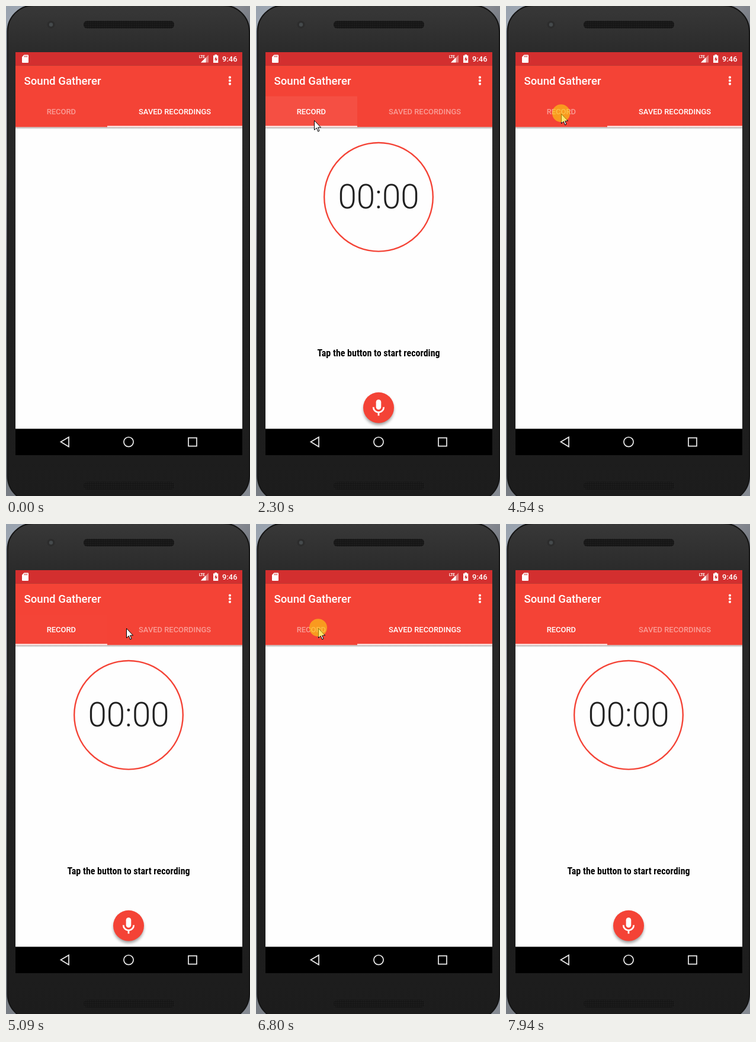
An HTML page that plays this animation: 412x828 px, repeating every 8.32 s.

```html
<!DOCTYPE html>
<html lang="en">
<head>
<meta charset="utf-8">
<title>Recorder tabs</title>
<style>
  html, body { margin: 0; width: 100%; height: 100%; overflow: hidden; }
  svg { display: block; width: 412px; height: 828px; }
  text { font-family: Roboto, sans-serif; fill: #fff; }
  .title { font-size: 18.64px; font-weight: 500; }
  .tab { font-size: 12.95px; font-weight: 500; text-anchor: middle; }
  .clock { font-size: 13px; font-weight: 500; }
  .lte { font-size: 6.4px; font-weight: 700; letter-spacing: -.3px; }
  .timer { font-size: 56.5px; font-weight: 300; fill: #212121; text-anchor: middle; }
  .tip { font: 700 16px "Roboto Condensed", Roboto, sans-serif; font-stretch: condensed; fill: #000; text-anchor: middle; }
  .nav { fill: none; stroke: #eee; stroke-width: 1.7; }
</style>
</head>
<body>
<svg viewBox="0 0 412 828">
  <defs>
    <linearGradient id="wall" x2=".6" y2="1">
      <stop offset="0" stop-color="#98a2ae"/>
      <stop offset=".25" stop-color="#bdbcc6"/>
      <stop offset=".5" stop-color="#6c7178"/>
      <stop offset="1" stop-color="#858a92"/>
    </linearGradient>
    <linearGradient id="body" x2="0" y2="1">
      <stop offset="0" stop-color="#383838"/>
      <stop offset=".1" stop-color="#2a2a2a"/>
      <stop offset=".5" stop-color="#222"/>
      <stop offset="1" stop-color="#1c1c1c"/>
    </linearGradient>
    <linearGradient id="drop" x2="0" y2="1">
      <stop offset="0" stop-opacity=".32"/>
      <stop offset="1" stop-opacity="0"/>
    </linearGradient>
    <pattern id="mesh" width="3" height="3" patternUnits="userSpaceOnUse">
      <rect width="3" height="3" fill="#141414"/>
      <circle cx="1.5" cy="1.5" r=".8" fill="#2a2a2a"/>
    </pattern>
    <filter id="blur" x="-50%" y="-50%" width="200%" height="200%"><feGaussianBlur stdDeviation="2.6"/></filter>
    <clipPath id="view"><rect x="16" y="204" width="383" height="511"/></clipPath>
  </defs>

  <!-- phone -->
  <rect width="412" height="828" fill="url(#wall)"/>
  <rect x="2.5" y="-1" width="408.5" height="839" rx="44" fill="url(#body)" stroke="#141414" stroke-width="2"/>
  <circle cx="76" cy="31.5" r="6.5" fill="#2c2c2c"/>
  <circle cx="76" cy="31.5" r="3.2" fill="#454a4c"/>
  <rect x="131" y="25" width="153" height="13" rx="6" fill="url(#mesh)"/>
  <rect x="131" y="804" width="153" height="13" rx="6" fill="url(#mesh)"/>

  <!-- page -->
  <rect x="16" y="204" width="383" height="511" fill="#fefefe"/>
  <g clip-path="url(#view)">
    <g id="page">
      <circle cx="207" cy="322.8" r="91.8" fill="none" stroke="#f44336" stroke-width="2.4"/>
      <text class="timer" x="207" y="342">00:00</text>
      <text class="tip" x="207" y="592">Tap the button to start recording</text>
      <circle cx="207" cy="682.5" r="25.5" opacity=".38" filter="url(#blur)"/>
      <circle cx="207" cy="678.7" r="26" fill="#f44336"/>
      <g transform="translate(189.8 662.1) scale(1.43)">
        <rect x="9" y="2" width="6" height="12" rx="3" fill="#fff"/>
        <path d="M5.85 11a6.15 6.15 0 0 0 12.3 0M12 17v4" fill="none" stroke="#fff" stroke-width="1.9"/>
      </g>
    </g>
    <rect x="16" y="204.5" width="383" height="4" fill="url(#drop)"/>
  </g>

  <!-- bars -->
  <rect x="16" y="78" width="383" height="22.4" fill="#d32f2f"/>
  <rect x="16" y="100.4" width="383" height="104.1" fill="#f44336"/>
  <path d="M30.5 82.5H37a1 1 0 0 1 1 1V95a1 1 0 0 1-1 1H28a1 1 0 0 1-1-1V86z" fill="#fff"/>
  <path d="M31.5 84v2.5M33.5 84v2.5M35.5 84v2.5" stroke="#d32f2f"/>
  <path d="M329 95.5 342 82.5V95.5z" fill="#fff" opacity=".4"/>
  <path d="M329 95.5 337.5 87V95.5z" fill="#fff"/>
  <text class="lte" x="326" y="87.5">LTE</text>
  <path d="M352.5 82h3.5v1.5h2.3V96H350V83.5h2.5z" fill="#fff"/>
  <path d="M355 85.5 352 90.5h2v3.5l3-5h-2z" fill="#d32f2f"/>
  <text class="clock" x="365" y="94">9:46</text>
  <text class="title" x="30.5" y="133">Sound Gatherer</text>
  <path d="M378 120.7v0m0 5.5v0m0 5.5v0" stroke="#fff" stroke-width="4.2" stroke-linecap="round"/>

  <!-- tabs -->
  <rect id="glow0" x="16" y="152.5" width="155" height="52" fill="#fff"/>
  <rect id="glow1" x="171" y="152.5" width="228" height="52" fill="#fff"/>
  <text class="tab" id="label0" x="93.3" y="183.3">RECORD</text>
  <text class="tab" id="label1" x="285" y="183.3">SAVED RECORDINGS</text>
  <rect id="bar" y="202.6" height="1.9" fill="#fff"/>

  <!-- navigation -->
  <rect x="16" y="714.4" width="383" height="44.6"/>
  <path class="nav" d="M106 728.5V744.7L92.5 736.6z"/>
  <circle class="nav" cx="207" cy="736.6" r="8.1"/>
  <rect class="nav" x="308" y="729.7" width="14" height="14"/>

  <!-- pointer -->
  <g id="pointer">
    <path d="M.5.5V16.5L4.3 13 6.7 19 9 18 6.6 12.2H11.5z" fill="#fff" stroke="#000"/>
    <circle id="press" cy="-.8" r="15" fill="#fcd611" opacity=".6"/>
  </g>
</svg>

<script>
const LOOP = 8320;
const $ = id => document.getElementById(id);
const clamp = v => Math.max(0, Math.min(1, v));
const mix = (a, b, k) => a + (b - a) * k;
const smooth = u => u * u * (3 - 2 * u);
const settle = u => 1 - (1 - u) ** 5;

// Pointer moves: start, end, x, y
const entry = [296, 803];
const moves = [
  [530, 750, 328, 664],
  [1240, 1900, 98, 193],
  [2450, 3070, 271, 182],
  [3700, 4160, 93, 182],
  [4850, 5205, 238, 174],
  [6250, 6630, 105, 176],
  [7200, 7630, 328, 808],
  [7630, 7940, 390, 828]
];
// Taps switch to the record tab and back in turn
const taps = [2030, 3240, 4540, 5710, 6800];
const DELAY = 93;

// Material standard curve, cubic-bezier(.4, 0, .2, 1)
function standard(u) {
  let lo = 0, hi = 1;
  for (let i = 0; i < 20; i++) {
    const s = (lo + hi) / 2, r = 1 - s;
    if (1.2 * s * r * r + .6 * s * s * r + s ** 3 < u) lo = s; else hi = s;
  }
  return smooth(lo);
}

function pointerAt(t) {
  let [x, y] = entry;
  for (const [from, to, toX, toY] of moves) {
    const k = smooth(clamp((t - from) / (to - from)));
    x = mix(x, toX, k);
    y = mix(y, toY, k);
  }
  return [Math.round(x), Math.round(y)];
}

function draw(t) {
  let active = 1, page = 1, bar = 1, pressed = false;
  const glow = [0, 0];
  taps.forEach((at, i) => {
    const tab = i % 2, age = t - at, run = age - DELAY;
    if (age < 0) return;
    pressed = age < 75;
    glow[tab] = .09 * clamp(age / 100) * clamp((560 - age) / 410);
    if (run >= 0) active = tab;
    page = mix(page, tab, settle(clamp(run / 240)));
    bar = mix(bar, tab, standard(clamp(run / 150)));
  });

  $('page').setAttribute('transform', `translate(${Math.round(-383 * page)} 0)`);
  const left = mix(16, 171, bar);
  $('bar').setAttribute('x', left);
  $('bar').setAttribute('width', mix(171, 399, bar) - left);
  glow.forEach((alpha, i) => {
    $('glow' + i).setAttribute('opacity', alpha);
    $('label' + i).setAttribute('opacity', i === active ? 1 : .48);
  });

  $('pointer').setAttribute('transform', `translate(${pointerAt(t)})`);
  $('pointer').style.display = t >= 530 && t < 7940 ? '' : 'none';
  $('press').style.display = pressed ? '' : 'none';
}

const start = performance.now();
function loop() {
  draw((performance.now() - start) % LOOP);
  requestAnimationFrame(loop);
}
loop();
</script>
</body>
</html>
```
